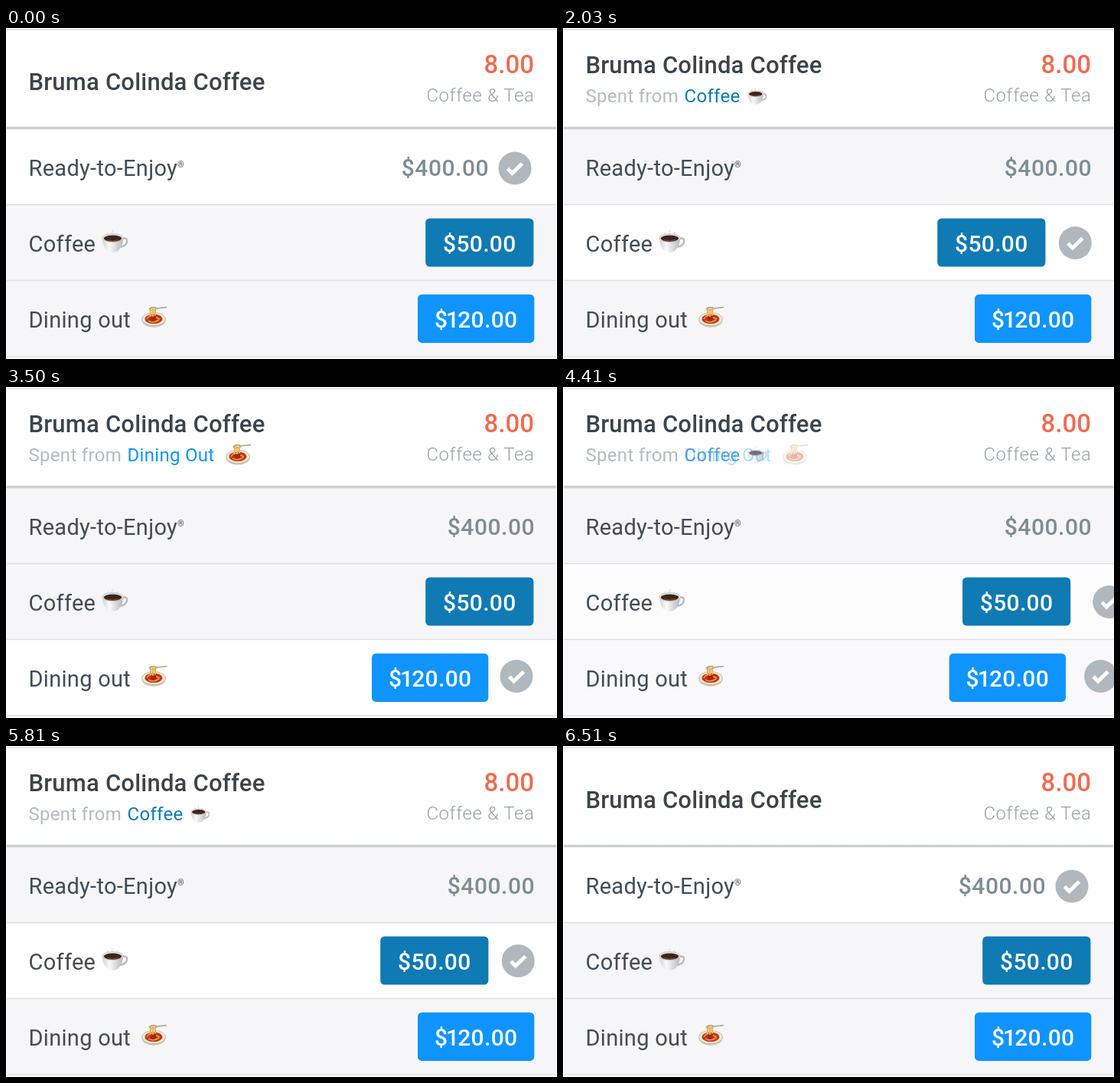
An HTML page for the animation above (6580 ms loop, 720 by 432 pixels).

```html
<!DOCTYPE html>
<html lang="en">
<head>
<meta charset="utf-8">
<title>Spending source picker</title>
<style>
  html, body { margin: 0; width: 100%; height: 100%; overflow: hidden; background: #fff; }
  svg { display: block; width: 720px; height: 432px; }
  text { font-family: Roboto, Inter, sans-serif; letter-spacing: .3px; }
  .title { font-size: 31px; font-weight: 500; fill: #3b444b; letter-spacing: .2px; }
  .label { font-size: 29px; fill: #434c54; }
  .small { font-size: 24px; fill: #b5bbc0; }
  .category { fill: #9aa1a7; font-weight: 300; text-anchor: end; letter-spacing: .6px; }
  .price { font-size: 33px; font-weight: 500; fill: #ee6b52; text-anchor: end; letter-spacing: 0; }
  .amount { font-size: 30px; font-weight: 500; fill: #7e8d91; letter-spacing: .5px; }
  .button text { fill: #fff; text-anchor: middle; letter-spacing: .3px; }
</style>
</head>
<body>
<svg viewBox="0 0 720 432">
  <defs>
    <linearGradient id="shadow" x2="0" y2="1">
      <stop offset="0" stop-color="#c6c8ca" stop-opacity="0"/>
      <stop offset=".4" stop-color="#c6c8ca"/>
      <stop offset=".6" stop-color="#c6c8ca"/>
      <stop offset="1" stop-color="#c6c8ca" stop-opacity="0"/>
    </linearGradient>
    <linearGradient id="china">
      <stop offset="0" stop-color="#d3d4d5"/><stop offset=".35" stop-color="#fafafa"/><stop offset="1" stop-color="#b4b6b8"/>
    </linearGradient>
    <g id="cup" fill="none">
      <path d="M9 6q-3-2 0-4M15 5q-3-3 0-6M21 6q-2-2 0-4" stroke="#dfe1e2" stroke-width="1.5"/>
      <path d="M26 10q8-2 7 4t-10 7" stroke="#b9bbbd" stroke-width="2.4"/>
      <path d="M1 9q0 12 7 17q6 4 13 0q7-6 7-17z" fill="url(#china)"/>
      <ellipse cx="14.5" cy="9" rx="13.7" ry="5.3" fill="#ececec" stroke="#b4b5b6" stroke-width=".8"/>
      <ellipse cx="14.5" cy="9.6" rx="11.8" ry="4.2" fill="#3f2417"/>
      <path d="M7 11.5q7 3 15 0" stroke="#80502e"/>
    </g>
    <g id="pasta" fill="none">
      <ellipse cx="16" cy="18.5" rx="15.5" ry="9.3" fill="#cfc6b2"/>
      <ellipse cx="16" cy="17" rx="15.5" ry="8.6" fill="#f1eadb" stroke="#b9ae98" stroke-width=".8"/>
      <ellipse cx="16" cy="16.8" rx="11.5" ry="6.3" fill="#c2351a"/>
      <path d="M7 17q3-6 8-4t9 4M9 19q6 4 14-1" stroke="#e8a441" stroke-width="1.5"/>
      <path d="M12 3v11M15 3v13M18 3v11" stroke="#e6b754" stroke-width="2"/>
      <path d="M12 13q3 2 7-1v6q-3 3-7 0z" fill="#a92413"/>
      <path d="M10 4q5-4 10-1M19 3L33 1.5" stroke="#aaa28e" stroke-width="1.7"/>
      <path d="M10 4.5q5 3 10-1" stroke="#e8b957" stroke-width="2.3"/>
    </g>
    <g id="check">
      <circle r="21.5" fill="#b0b8bd"/>
      <path d="M-9.5 .5l6 6L9.5-6" fill="none" stroke="#fff" stroke-width="5"/>
    </g>
  </defs>

  <rect width="720" height="432" fill="#fff"/>
  <rect x="1" y="131" width="718" height="298" fill="#f6f6f9"/>
  <g id="rows"></g>
  <path d="M1 2H719M1 230.5H719M1 329.5H719M1 429H719" stroke="#dcdee0" stroke-width="1.6"/>
  <rect x="1" y="128" width="718" height="5" fill="url(#shadow)"/>

  <g id="head">
    <text class="title" x="29.5" y="80.5">Bruma Colinda Coffee</text>
    <g id="source">
      <text class="small" x="29.5" y="118.5">Spent from</text>
      <g id="fromCoffee">
        <text class="small" x="158.5" y="118.5" style="fill:#0f7ab3">Coffee</text>
        <use href="#cup" transform="translate(241 101) scale(.74)"/>
      </g>
      <g id="fromDining">
        <text class="small" x="158.5" y="118.5" style="fill:#1094ff">Dining Out</text>
        <use href="#pasta" x="287" y="96"/>
      </g>
    </g>
  </g>
  <text class="price" x="690" y="59">8.00</text>
  <text class="small category" x="690.5" y="96">Coffee &amp; Tea</text>
</svg>

<script>
const LOOP = 6580;
const FADE = 120;
const HEAD_RATE = 27;
const $ = id => document.getElementById(id);

const SAFE = 0, COFFEE = 1, DINING = 2;

const button = (x, y, width, color, value) => `<g class="button">
  <rect x="${x}" y="${y}" width="${width}" height="63.2" rx="5.5" fill="${color}"/>
  <text class="amount" x="${x + width / 2}" y="${y + 43.3}">${value}</text></g>`;

const rows = [
  { y: 132, height: 98, shift: 60, check: [665, 183],
    label: 'Ready-to-Enjoy<tspan font-size="11" dy="-11">®</tspan>', icon: '',
    amount: '<text class="amount" x="691" y="192.5" text-anchor="end">$400.00</text>' },
  { y: 231, height: 98, shift: 59, check: [669.3, 280.5],
    label: 'Coffee', icon: '<use href="#cup" x="125" y="265"/>',
    amount: button(548.2, 248.4, 141.2, '#0f7ab3', '$50.00') },
  { y: 330, height: 98, shift: 60, check: [667, 377.5],
    label: 'Dining out', icon: '<use href="#pasta" x="177" y="363"/>',
    amount: button(538, 347.7, 152.3, '#1094ff',
      '$<tspan dx="-2.2">1</tspan><tspan dx="-2.2">20.00</tspan>') },
];

$('rows').innerHTML = rows.map(r => `<g>
  <rect class="lit" x="1" y="${r.y}" width="718" height="${r.height}" fill="#fff"/>
  <text class="label" x="29.5" y="${r.y + 60.7}">${r.label}</text>${r.icon}
  <g class="slide">${r.amount}</g>
  <use class="tick" href="#check"/></g>`).join('');

rows.forEach((r, i) => {
  const g = $('rows').children[i];
  for (const part of ['lit', 'slide', 'tick']) r[part] = g.querySelector('.' + part);
});

// Each step moves the selection; rate is the stiffness of its settling.
const steps = [
  { at: 1040, from: SAFE, to: COFFEE, rate: 45 },
  { at: 2650, from: COFFEE, to: DINING, rate: 18.6 },
  { at: 4330, from: DINING, to: COFFEE, rate: 18.6 },
  { at: 5940, from: COFFEE, to: SAFE, rate: 30 },
];

// Critically damped spring from 0 to 1.
const settle = (ms, rate) => {
  const x = ms / 1000 * rate;
  return 1 - (1 + x) * Math.exp(-x);
};

const move = (el, x, y) => el.setAttribute('transform', `translate(${x.toFixed(2)} ${y.toFixed(2)})`);

function draw(now) {
  const t = now % LOOP;
  const step = steps.findLast(s => s.at <= t) || { ...steps[3], at: steps[3].at - LOOP };
  const age = t - step.at;
  const share = (row, p) => row === step.to ? p : row === step.from ? 1 - p : 0;
  const slide = settle(age, step.rate);
  const fade = Math.min(1, age / FADE);

  rows.forEach((r, i) => {
    const p = share(i, slide);
    r.lit.setAttribute('opacity', share(i, fade));
    move(r.slide, -r.shift * p, 0);
    move(r.tick, r.check[0] + 80 * (1 - p), r.check[1]);
  });

  move($('head'), 0, -22 * (1 - share(SAFE, settle(age, HEAD_RATE))));
  $('source').setAttribute('opacity', 1 - share(SAFE, fade));
  const toSafe = step.to === SAFE, fromSafe = step.from === SAFE;
  $('fromCoffee').setAttribute('opacity', toSafe || fromSafe ? 1 : share(COFFEE, fade));
  $('fromDining').setAttribute('opacity', share(DINING, fade));
}

const start = performance.now();
function tick() {
  draw(performance.now() - start);
  requestAnimationFrame(tick);
}
tick();
</script>
</body>
</html>
```
